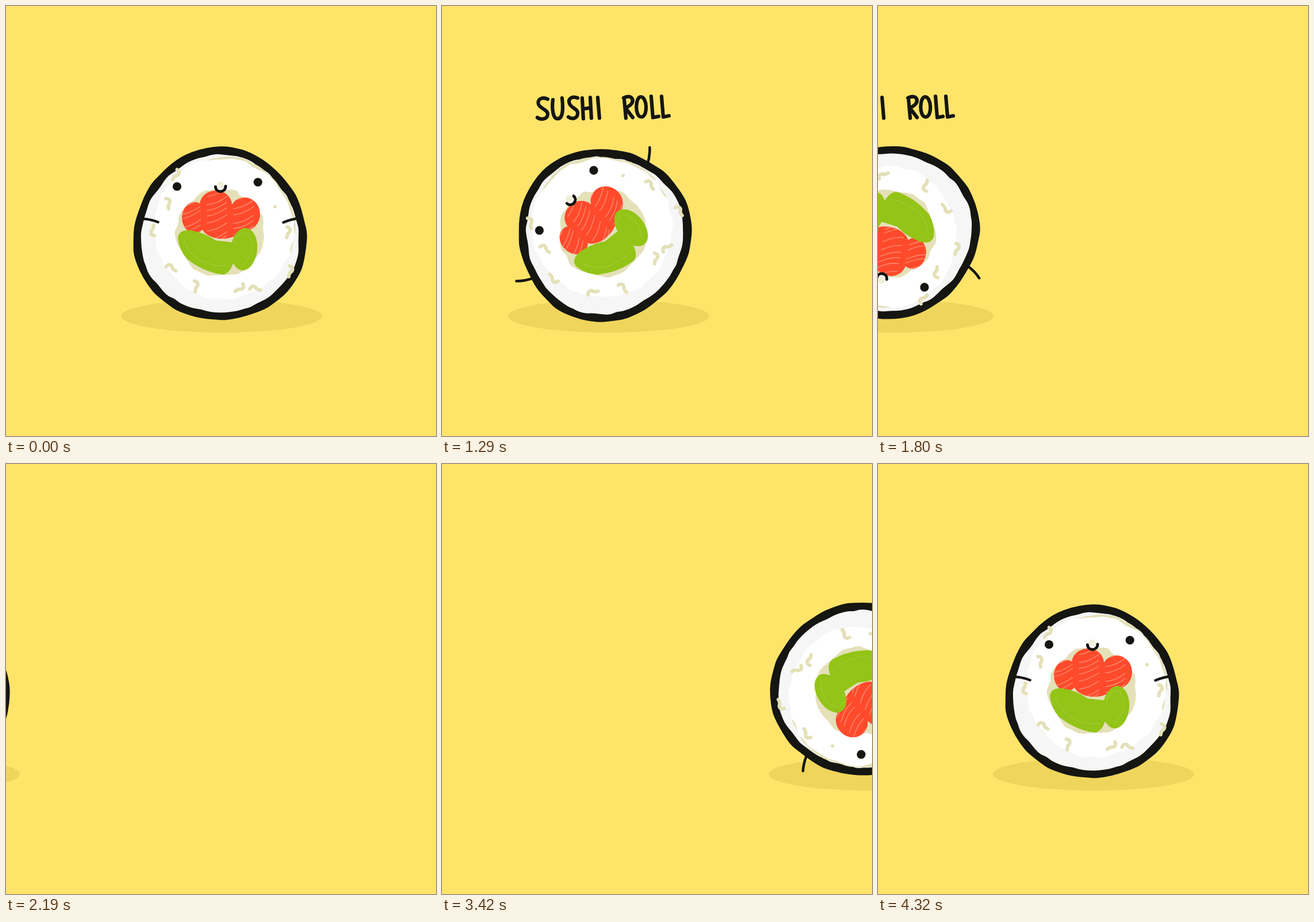
These frames come from a looping animation (748 px wide and 748 px high, 4350 ms). An HTML page:

```html
<!DOCTYPE html>
<html lang="en">
<head>
<meta charset="utf-8">
<title>Sushi roll</title>
<style>
html, body { margin: 0; height: 100%; overflow: hidden; background: #ffe46a; }
svg { display: block; width: 100vw; height: 100vh; }
.line, .thin { fill: none; stroke: #151512; stroke-linecap: round; stroke-linejoin: round; }
</style>
</head>
<body>
<svg viewBox="0 0 748 748">
  <defs>
    <clipPath id="fish">
      <ellipse cx="328" cy="368" rx="22" ry="27"/>
      <ellipse cx="365" cy="346" rx="28" ry="25"/>
      <ellipse cx="415" cy="362" rx="27" ry="29"/>
      <ellipse cx="376" cy="382" rx="36" ry="23"/>
    </clipPath>
  </defs>
  <ellipse id="shadow" cx="375" cy="539.500" rx="175" ry="28.500" fill="#efd55b"/>
  <g id="roll">
    <path id="nori" fill="#151512"/>
    <path id="fringe" fill="#f6f6f7"/>
    <path id="husk" fill="#e4e0b8"/>
    <path id="rice" fill="#fff"/>
    <path id="crumbs" class="thin" style="stroke: #e4e0b8" stroke-width="6"/>
    <path id="core" fill="#e4e0b8"/>
    <g clip-path="url(#fish)">
      <rect x="300" y="315" width="150" height="95" fill="#ff4a2c"/>
      <path id="grain" class="thin" style="stroke: #fb8467" stroke-width="1.600"/>
    </g>
    <path fill="#93c417" d="M299 404Q300 389 320 390Q345 394 365 408L394 411L396 445Q389 467 376 467Q344 463 315 440Q301 424 299 404Z"/>
    <ellipse cx="414" cy="423" rx="23" ry="37" transform="rotate(6 414 423)" fill="#93c417"/>
    <path d="M309 405q10 30 35 40q20 8 42 7M397 416q1-16 14-22q15 2 17 23q-2 21-15 33" fill="none" stroke="#9fca32" stroke-width="1.500"/>
    <circle cx="373" cy="311" r="6" fill="#f2efd9"/>
    <path class="line" d="M364.500 314.500C365 325.500 382 325.500 382 313.500" stroke-width="5"/>
    <circle cx="297.500" cy="314" r="7.600" fill="#151512"/>
    <circle cx="438.200" cy="306.500" r="7.600" fill="#151512"/>
    <path id="armL" class="line" d="M233 370Q250 370 264.500 376" stroke-width="4.500"/>
    <path id="armR" class="line" d="M512 369Q497 370 482.500 376.500" stroke-width="4.500"/>
  </g>
  <g id="words" class="line" stroke-width="6.200" role="img" aria-label="SUSHI ROLL"></g>
</svg>
<script>
const LOOP = 4350, RAD = Math.PI / 180;
const $ = id => document.getElementById(id);
const { sin, cos, min, max } = Math;

let seed = 7;
const random = () => (seed = seed * 16807 % 2147483647) / 2147483647;

// Smooth closed curve around the centre, with a randomly uneven rim
function ring(id, radius, count, rough) {
  const pts = Array.from({ length: count }, (_, i) => {
    const a = (i + random() * .6) / count * 2 * Math.PI;
    const r = radius(a) + (random() * 2 - 1) * rough;
    return [372.5 + r * cos(a), 395 + r * sin(a)];
  });
  const mid = i => {
    const p = pts[i % count], q = pts[(i + 1) % count];
    return [(p[0] + q[0]) / 2, (p[1] + q[1]) / 2];
  };
  $(id).setAttribute('d', `M${mid(count - 1)}` + pts.map((p, i) => `Q${p} ${mid(i)}`).join('') + 'Z');
}

// Radii by angle: each layer stays inside the one before it
const outer = a => 151 + 3 * cos(a - 95 * RAD) + 3 * sin(3 * a);
const inner = a => outer(a) - 14;
const toward = (a, base, lean) => base + lean * cos(a - 310 * RAD);
ring('nori', outer, 44, 1.3);
ring('fringe', inner, 70, 1.6);
ring('husk', a => min(inner(a), toward(a, 117, 20)), 70, 2);
ring('rice', a => min(inner(a) - 4, toward(a, 122, 10)), 64, 3);
ring('core', () => 76.5, 40, 4);

// The same curl, placed and turned around the rice
const crumbs = [[282, 344, 0], [256, 390, 190], [288, 456, -50], [330, 488, 10], [406, 491, 60],
  [434, 492, -70], [490, 394, 15], [295, 294, 40], [494, 462, 20]];
$('crumbs').setAttribute('d', crumbs.map(([x, y, turn]) => {
  const c = cos(turn * RAD), s = sin(turn * RAD);
  const at = (u, v) => [u * c - v * s, u * s + v * c];
  return `M${x + at(-4, -9)[0]} ${y + at(-4, -9)[1]}q${at(8, 0)} ${at(7, 7)}q${at(-4, 5)} ${at(-2, 11)}`;
}).join('') + 'M468 349h.1');

// Wavy fibres rising to the right
let fibres = '';
for (let y = 345; y < 440; y += 12)
  for (let x = 304; x < 440; x += 46) {
    const rise = y - (x - 304) * .35 + random() * 6;
    fibres += `M${x} ${rise}q${12 + random() * 6} -1 34 -14`;
  }
$('grain').setAttribute('d', fibres);

// Hand-drawn letters in writing order
const letters = [
  'M269 162C259 157 250 163 253 171C256 179 270 180 269 189C268 198 256 198 251 194',
  'M278 163C276 178 278 196 286 196C296 196 296 178 294 160',
  'M321 160C311 156 303 162 307 170C310 178 323 179 321 188C320 197 310 197 305 193',
  'M329 160L331 196M343 159L345 195M331 179L344 177',
  'M356 159L359 195',
  'M402 161L405 195M401 160C416 151 426 169 404 177L417 194',
  'M431 158C421 158 420 193 432 193C444 192 442 158 431 158Z',
  'M449 157L452 194L462 192',
  'M467 157L470 193L480 191'
].map((d, i) => {
  const el = document.createElementNS('http://www.w3.org/2000/svg', 'path');
  el.setAttribute('d', d);
  $('words').append(el);
  return { el, time: i < 5 ? 30 + 120 * i : 720 + 90 * (i - 5) };
});

function ease(t, start, end) {
  const u = min(1, max(0, (t - start) / (end - start)));
  return u * u * (3 - 2 * u);
}

function draw(t) {
  const leaving = t < 2650;
  const gone = leaving ? ease(t, 887, 2440) : 1 - ease(t, 2865, 4225);
  const glide = leaving ? -570 * ease(t, 916, 2454) : 570 * (1 - ease(t, 2882, 4225));
  const turn = leaving ? -267 * gone : 216 * (1 - ease(t, 2891, 4234));
  const arm = 157 * (ease(t, 570, 944) - ease(t, 4050, 4320));
  const move = (id, value) => $(id).setAttribute('transform', value);
  move('shadow', `translate(${glide})`);
  move('words', `translate(${glide})`);
  move('roll', `translate(${(leaving ? -553 : 556) * gone}) rotate(${turn} 372.5 395)`);
  move('armL', `rotate(${-arm} 233 368)`);
  move('armR', `rotate(${arm} 512 367)`);
  for (const { el, time } of letters) el.style.display = leaving && t >= time ? '' : 'none';
}

const begin = performance.now();
function tick() {
  draw((performance.now() - begin) % LOOP);
  requestAnimationFrame(tick);
}
tick();
</script>
</body>
</html>
```
